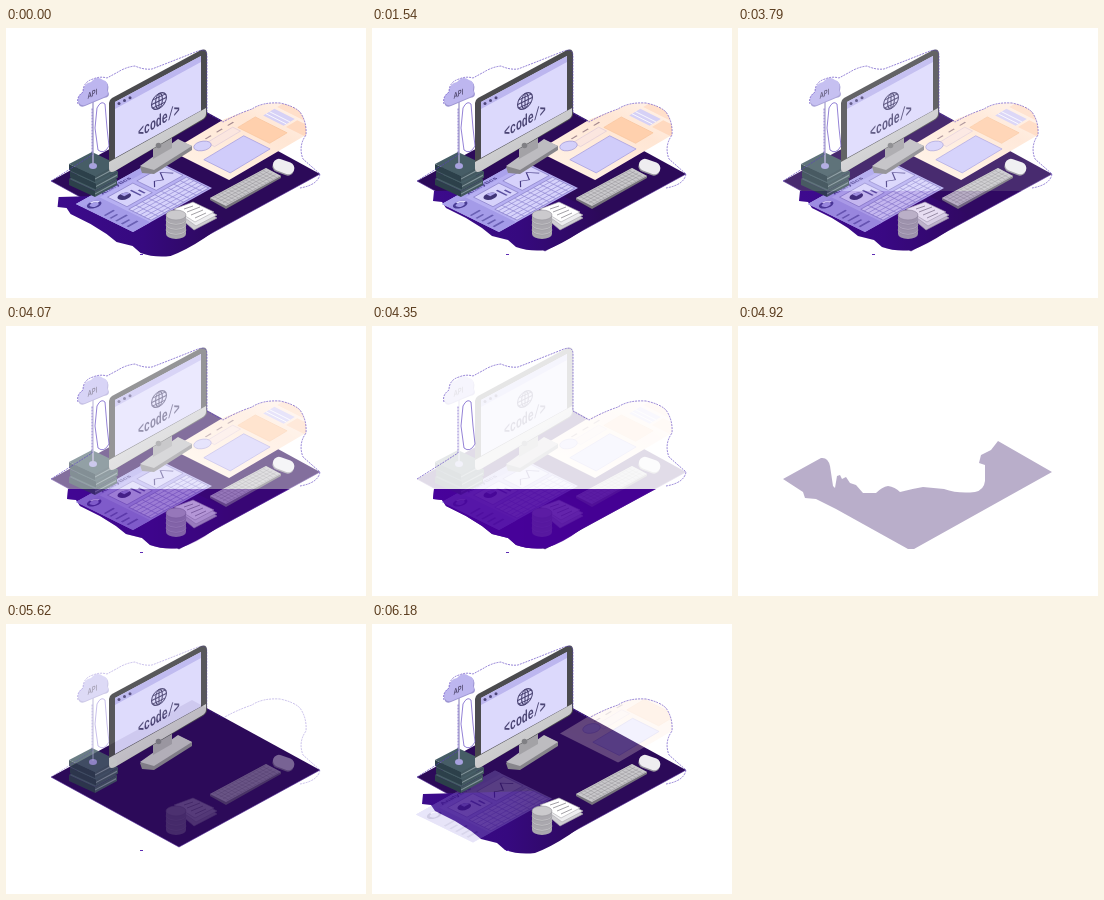
An HTML page that plays this animation: 360x270 px, repeating every 6.32 s.

```html
<!DOCTYPE html>
<html lang="en">
<head>
<meta charset="utf-8">
<title>Isometric desk</title>
<style>
html, body { margin: 0; width: 100%; height: 100%; overflow: hidden; background: #fff; }
svg { display: block; width: 100vw; height: 100vh; }
</style>
</head>
<body>
<svg id="stage" viewBox="0 0 360 270" xmlns="http://www.w3.org/2000/svg">
  <defs>
    <linearGradient id="metal" x2="1" y2="1">
      <stop stop-color="#dededf"/><stop offset="1" stop-color="#b9b9bb"/>
    </linearGradient>
    <linearGradient id="warm">
      <stop stop-color="#fff0e3"/><stop offset=".6" stop-color="#ffe6d4"/><stop offset="1" stop-color="#fff4ec"/>
    </linearGradient>
    <linearGradient id="glow">
      <stop stop-color="#3c0b8c"/><stop offset=".5" stop-color="#36097f"/><stop offset="1" stop-color="#2c0958"/>
    </linearGradient>
    <clipPath id="warmClip">
      <path d="M160 122L216 92Q232 86 246 81Q256 74 274 75Q288 78 294 84Q301 94 300 107L218 155Z"/>
    </clipPath>
    <clipPath id="lower"><rect y="163" width="360" height="107"/></clipPath>
  </defs>

  <path id="deskPart" fill="#2f0e60" d="M45 153L83 132Q90 131 92 140L95 160L97 162L99 150L102 149L104 153L108 151L112 157L118 159L125 167L138 167Q144 161 150 160Q157 161 162 166Q173 163 185 161L206 163Q220 168 237 166Q246 164 247 155V139L241 137L243 129L253 124L260 115L314 146L176 223H170L98 183L78 173L67 172L65 166Z"/>
  <g id="desk">
    <path fill="#2c0a59" d="M45 153L186 76L314 146L173 223Z"/>
    <path fill="none" stroke="#4b2190" stroke-width=".6" d="M45 153L173 223L314 146"/>
  </g>
  <path id="spill" fill="url(#glow)" d="M62 163L61 173L70 174L74 180L94 190L110 200L120 208L136 212L144 219Q158 224 174 222Q190 216 208 204L232 187L173 160Z"/>
  <path id="speck" stroke="#5d2bb3" d="M134 226.5h3"/>

  <g id="warmSheet" clip-path="url(#warmClip)">
    <g id="warmSlide">
      <g transform="matrix(.7 -.42 .6 .3 165 123)">
        <rect width="150" height="100" fill="url(#warm)"/>
        <g fill="#a58a90"><rect x="38" y="12" width="8" height="2"/><rect x="54" y="12" width="8" height="2"/><rect x="70" y="12" width="8" height="2"/></g>
        <rect x="34" y="20" width="37" height="13" fill="#fbe6df" stroke="#d9c4d8" stroke-width=".7"/>
        <circle cx="27" cy="21" r="9.5" fill="#d4d0fa" stroke="#9990d2" stroke-width=".8"/>
        <rect x="10" y="43" width="57" height="44" fill="#d0ccfa" stroke="#9d95dc" stroke-width=".8"/>
        <rect x="74" y="25" width="25" height="53" fill="#ffd0ad" stroke="#f8c29c" stroke-width=".8"/>
        <rect x="106" y="30" width="16" height="34" fill="#d6d1f6"/>
        <path stroke="#fff" d="M110 30v34M115 30v34"/>
        <rect x="126" y="30" width="14" height="70" fill="#ffdfca"/>
        <rect x="106" y="68" width="16" height="32" fill="#ffd9bf"/>
      </g>
    </g>
  </g>

  <g id="lilacSheet">
    <g transform="matrix(.79 -.44 .57 .28 70 176)">
      <rect width="100" height="100" fill="#b7b0f2"/>
      <rect width="22" height="100" fill="#a49be8"/>
      <rect width="100" height="11" fill="#aaa2ec"/>
      <text x="27" y="9" font-family="Inter, sans-serif" font-weight="700" font-size="8" fill="#493c8c">Analytics</text>
      <circle cx="10" cy="18" r="6" fill="none" stroke="#4a3d95" stroke-width="3"/>
      <path d="M10 12A6 6 0 0 1 16 18" fill="none" stroke="#ddd9ff" stroke-width="3"/>
      <path stroke="#6a60b4" stroke-width="3" d="M3 46h12M3 56h9M3 66h14M3 76h10M3 86h13"/>
      <g fill="#d6d2fb" stroke="#7a70bd" stroke-width=".7"><rect x="27" y="18" width="32" height="34"/><rect x="64" y="18" width="34" height="34"/><rect x="25" y="58" width="73" height="39"/></g>
      <circle cx="38" cy="32" r="7" fill="#403477"/>
      <path fill="#aaa1e8" d="M38 32V25A7 7 0 0 1 45 32Z"/>
      <path stroke="#5b50a0" stroke-width="2" d="M49 28v18M54 35v11"/>
      <path fill="none" stroke="#453a83" stroke-width="1.2" d="M67 45l7-10 7 6 7-15 7 13"/>
      <path id="grid" stroke="#9188d2" stroke-width=".8"/>
    </g>
  </g>

  <g id="books"></g>

  <g id="monitor">
    <path fill="#87868b" d="M134 139L172 112L186 118V122L148 146L136 145Z"/>
    <path fill="#bdbcc0" d="M134 138L172 111L186 118L148 142Z"/>
    <path fill="#a3a2a6" d="M147 119L166 108V120L147 131Z"/>
    <path fill="#4b4b4e" d="M103 75Q103 72 106 70L195 22Q201 20 201 26V86Q201 89 197 92L109 143Q103 146 103 140Z"/>
    <path fill="url(#metal)" d="M103 134L200 80V86Q200 89 196 91.5L109 143Q103 146 103 140Z"/>
    <path fill="#dcd9fc" d="M109 74L195 28V82.5L109 130Z"/>
    <path fill="#bcb6ef" d="M109 74L195 28V34L109 81Z"/>
    <g fill="#4e467b"><circle cx="113" cy="75.5" r="1.5"/><circle cx="118.5" cy="72.6" r="1.5"/><circle cx="124" cy="69.7" r="1.5"/></g>
    <ellipse cx="152.5" cy="117.5" rx="2.8" ry="2.8" fill="#808084"/>
    <g fill="none" stroke="#4b4574" stroke-width="1.1" transform="translate(153 73) skewY(-26)">
      <circle r="7.5"/><ellipse rx="3.4" ry="7.5"/><path d="M0-7.5V7.5M-7.5 0H7.5M-6.3-4H6.3M-6.3 4H6.3"/>
    </g>
    <text transform="matrix(.62 -.36 0 1 132 110)" font-family="'Liberation Mono', monospace" font-size="16" font-weight="700" fill="#4b4574">&lt;code/&gt;</text>
  </g>

  <g id="api">
    <path fill="none" stroke="#aaa4cf" stroke-width="1.5" d="M87 74V137"/>
    <path fill="#9d95d2" d="M73 77Q70 69 77 65Q77 56 85 55Q91 48 97 53Q104 54 102 63Q105 69 98 70L79 78Q75 80 73 77Z"/>
    <path fill="#bdb6ef" d="M73 75Q70 68 77 64Q78 55 85 54Q91 47 97 52Q103 53 101 62Q104 67 98 69L79 77Q75 78 73 75Z"/>
    <text transform="matrix(.75 -.37 0 1 81.5 71)" font-family="Inter, sans-serif" font-size="8" font-weight="600" fill="#51496f">API</text>
  </g>

  <g id="input">
    <path fill="#77747c" d="M204 170L260 140L275 148V150L220 181L204 172Z"/>
    <path fill="#c9c8cb" d="M204 170L260 140L275 148L220 178Z"/>
    <path id="keys" fill="none" stroke="#858289" stroke-width=".8" transform="matrix(.56 -.3 .16 .08 204 170)"/>
    <g transform="rotate(20 277.5 139)">
      <rect x="266.5" y="134" width="22" height="12" rx="6" fill="#97949e"/>
      <rect x="266.5" y="132.5" width="22" height="12" rx="6" fill="#eeedf0"/>
    </g>
  </g>

  <g id="papers">
    <g stroke="#aaa8ae" stroke-width=".6">
      <path fill="#cfced2" d="M174 190L196 180L211 190L188 202Z"/>
      <path fill="#eeeef0" d="M171 184L191 177L211 187L190 198Z"/>
      <path fill="#fff" d="M168 181L187 174L208 184L189 194Z"/>
    </g>
    <path stroke="#8b888f" stroke-width=".8" d="M178 181l9-3M181 184l13-5M185 187l12-5M189 190l11-5"/>
    <g id="coins"></g>
  </g>

  <rect id="veil" width="360" height="163" fill="#fff"/>
  <g id="indigo" clip-path="url(#lower)">
    <path fill="#4a009e" d="M62 163L61 173L70 174L74 180L94 190L110 200L120 208L136 212L144 219Q158 224 174 222Q191 217 208 204L284 163Z"/>
  </g>
  <g id="outline" fill="none" stroke="#5a3fc0" stroke-width=".65" stroke-dasharray="2 1">
    <path d="M45 153L72 136L86 127V80M72 76Q70 69 77 64Q77 54 87 51Q94 48 101 50L112 44Q120 39 129 38Q138 42 146 41L159 36L192 23Q201 20 201 28V85L217 94Q231 86 246 81Q256 74 274 75Q288 78 294 84Q301 94 300 107Q292 118 297 131L314 146Q312 157 294 160"/>
    <path stroke-dasharray="none" d="M91 80Q95 72 99 76L101 100L103 118Q98 127 92 122L89 100Z"/>
  </g>
</svg>

<script>
const LOOP = 6320, STEP = 140, FADE_START = 3370, BUILD_START = 4920;
const el = id => document.getElementById(id);
const clamp = x => Math.max(0, Math.min(1, x));
const ease = (t, from, to) => {
  const x = clamp((t - from) / (to - from));
  return x * x * (3 - 2 * x);
};
const show = (id, opacity) => el(id).setAttribute('opacity', opacity);
const shift = (id, x, y) => el(id).setAttribute('transform', `translate(${x} ${y})`);
const range = (n, fn) => Array.from({ length: n }, (_, i) => fn(i)).join('');

el('grid').setAttribute('d',
  range(8, i => `M${34 + i * 8} 58V97`) + range(5, i => `M25 ${64 + i * 7}H98`));
el('keys').setAttribute('d',
  range(15, i => `M${6 + i * 6.2} 8V92`) + range(5, i => `M3 ${8 + i * 21}H97`));
el('books').innerHTML = range(3, i => {
  const y = 151 - i * 7.5, x = 87 + (i % 2);
  return `<g transform="translate(${x} ${y})">
    <path fill="#2c404a" d="M-24 0L2 12V18L-24 6Z"/>
    <path fill="#42575f" d="M24 0L2 12V18L24 6Z"/>
    <path fill="#83959b" d="M23 3L2 14.5V15.5L23 4.5Z"/>
    <path fill="#465d66" d="M-24 0L-1-12L24 0L2 12Z"/></g>`;
}) + '<ellipse cx="87" cy="138" rx="4" ry="3" fill="#a7a1df"/>';
el('coins').innerHTML = range(4, i => {
  const y = 206 - i * 5;
  return `<path fill="#aaa8ae" d="M160 ${y - 4}V${y}A10 5 0 0 0 180 ${y}V${y - 4}Z"/>
    <ellipse cx="170" cy="${y - 4}" rx="10" ry="5" fill="#cbcacd" stroke="#98959c" stroke-width=".6"/>`;
});

// Each part: start and end of its appearance, measured from the rebuild.
const parts = {
  monitor: [350, 770], books: [350, 840], api: [490, 910], input: [490, 980],
  papers: [560, 1050], lilacSheet: [1190, 1400], warmSheet: [1190, 1400], spill: [1050, 1260]
};

function draw(time) {
  const t = time % LOOP;
  const fadeTime = Math.floor((t - FADE_START) / STEP) * STEP;
  const fading = t < BUILD_START;
  const fade = fading ? clamp(fadeTime / 1050) ** 2.2 : 0;
  const elapsed = fading ? t + LOOP - BUILD_START : t - BUILD_START;
  const build = Math.floor(elapsed / STEP) * STEP;

  el('stage').style.visibility = fade === 1 ? 'hidden' : 'visible';
  show('deskPart', build < 420 ? clamp((build + 140) / 420) : 0);
  show('desk', build < 420 ? 0 : 1);
  show('speck', build < 280 ? 0 : 1);
  for (const [id, [from, to]] of Object.entries(parts)) show(id, ease(build, from, to));

  // The sheets slide in along the desk from opposite sides.
  const slide = 1 - ease(build, 1120, 1400);
  shift('lilacSheet', -52 * slide, 29 * slide);
  shift('warmSlide', 46 * slide, -27 * slide);
  const settle = 1 - clamp((build - 1260) / 980);
  shift('spill', -11 * settle, 7 * settle);

  show('veil', fade);
  show('indigo', fade);
  show('outline', ease(build, 420, 980));
}

const start = performance.now();
function tick() {
  draw(performance.now() - start);
  requestAnimationFrame(tick);
}
tick();
</script>
</body>
</html>
```
